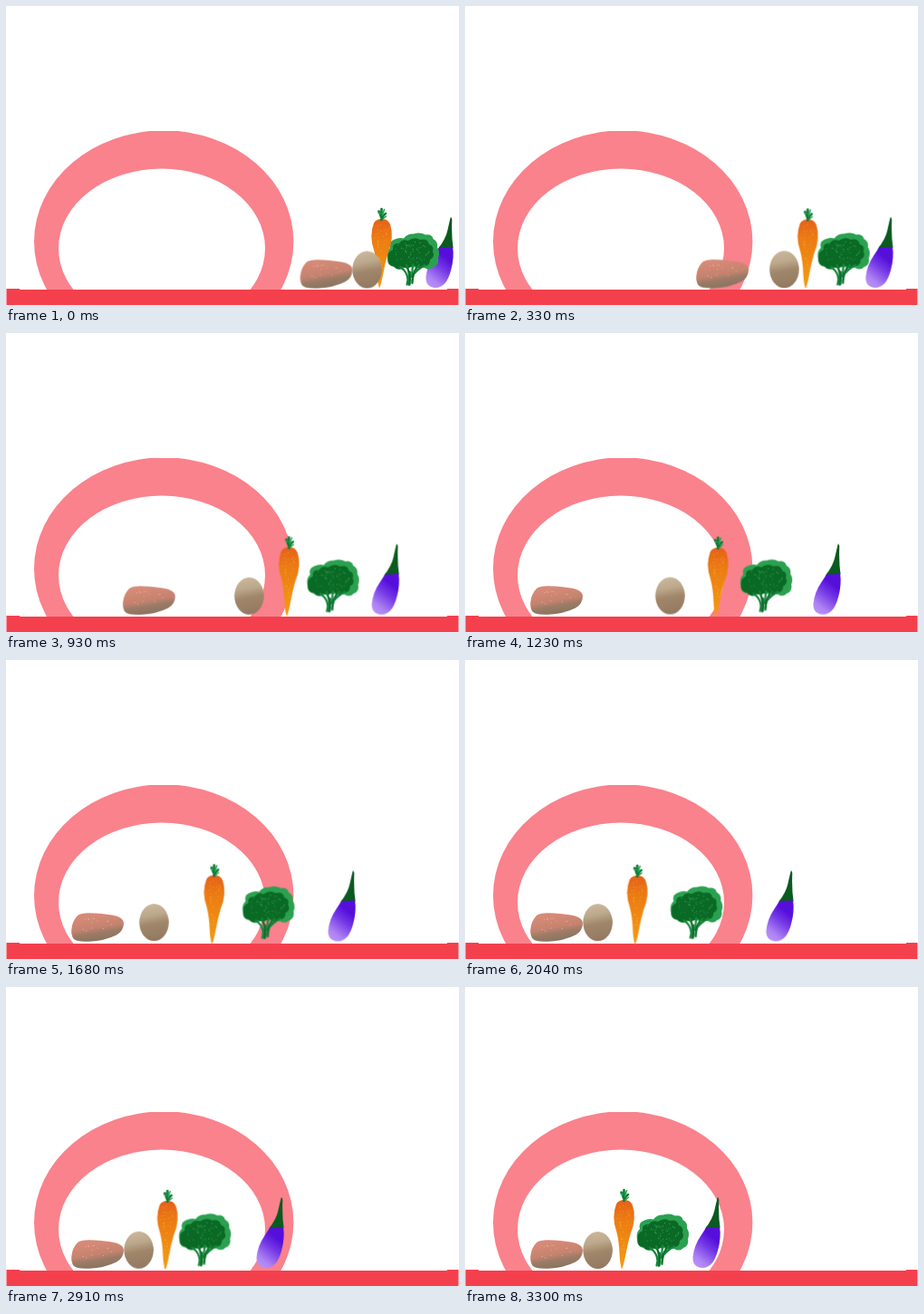
An HTML page that plays this animation: 500 px wide and 330 px high, repeating every 4630 ms.

```html
<!DOCTYPE html>
<html lang="en">
<head>
<meta charset="utf-8">
<title>Vegetables</title>
<style>
html, body { margin: 0; width: 100%; height: 100%; overflow: hidden; background: #fff; }
svg { display: block; width: 500px; height: 330px; }
.veg { animation: 4630ms infinite; }
#potato { animation-name: potato; }
#egg { animation-name: egg; }
#carrot { animation-name: carrot; }
#broccoli { animation-name: broccoli; }
#eggplant { animation-name: eggplant; }

/* Positions advance every 30 ms, then rest from 3300 ms on. */
@keyframes potato {
  0% { transform: translate(252.5px, .8px); animation-timing-function: steps(40); }
  25.917%, 100% { transform: none; }
}
@keyframes egg {
  0% { transform: translate(252px, .5px); animation-timing-function: steps(60); }
  38.876% { transform: translate(0, -1px); animation-timing-function: steps(50); }
  71.274%, 100% { transform: translate(0, 0); }
}
@keyframes carrot {
  0% { transform: translate(239px, 0); animation-timing-function: steps(70); }
  45.356% { transform: translate(8px, 3px); animation-timing-function: steps(40); }
  71.274%, 100% { transform: translate(0, 0); }
}
@keyframes broccoli {
  0% { transform: translate(231px, 0); animation-timing-function: steps(80); }
  51.835% { transform: translate(3px, -1px); animation-timing-function: steps(30); }
  71.274%, 100% { transform: translate(0, 0); }
}
@keyframes eggplant {
  0% { transform: translate(212px, 1px); animation-timing-function: steps(110); }
  71.274%, 100% { transform: translate(0, 0); }
}
</style>
</head>
<body>
<svg viewBox="0 0 500 330">
  <defs>
    <linearGradient id="potatoFill" x1=".35" y1="0" x2=".65" y2="1">
      <stop offset=".1" stop-color="#d68a77"/>
      <stop offset=".5" stop-color="#c5836f"/>
      <stop offset=".68" stop-color="#9c7b66"/>
      <stop offset="1" stop-color="#84735f"/>
    </linearGradient>
    <linearGradient id="eggFill" x1=".4" y1="0" x2=".55" y2="1">
      <stop offset="0" stop-color="#cbb79c"/>
      <stop offset=".3" stop-color="#bca88b"/>
      <stop offset=".55" stop-color="#a0866a"/>
      <stop offset="1" stop-color="#937961"/>
    </linearGradient>
    <linearGradient id="carrotFill" x1="0" y1="0" x2="0" y2="1">
      <stop offset="0" stop-color="#e5611a"/>
      <stop offset=".3" stop-color="#ec7c14"/>
      <stop offset="1" stop-color="#f49c10"/>
    </linearGradient>
    <linearGradient id="eggplantFill" x1=".75" y1="0" x2=".25" y2="1">
      <stop offset=".25" stop-color="#560fdb"/>
      <stop offset=".5" stop-color="#7438e6"/>
      <stop offset=".85" stop-color="#ae83f4"/>
      <stop offset="1" stop-color="#b890f6"/>
    </linearGradient>
    <clipPath id="ringClip"><path d="M0 138h500v175H0z"/></clipPath>
  </defs>

  <path clip-path="url(#ringClip)" fill="#f9828c" fill-rule="evenodd" d="M31 260a143.2 122.7 0 0 1 286.4 0a143.2 122.7 0 0 1-286.4 0z
    M58 267.5a114 88 0 0 1 228 0a114 88 0 0 1-228 0z"/>
  <path fill="#f4404d" d="M.5 312H15v1H487v-1h12.500v18H.5z"/>

  <g id="eggplant" class="veg">
    <path fill="url(#eggplantFill)" d="M267 264Q274 261 281 264Q283 277 279 291Q274 310 262 310Q251 309.500 251.500 298Q253 285 260 275Q264 269 267 264z"/>
    <path fill="#0b5a20" d="M278.600 232.500Q280 231.500 280.300 235Q279.500 252 281.600 266Q278 263.500 274.500 266Q270 264 264.800 267Q273.500 256 275.500 246Q277 239 278.600 232.500z"/>
  </g>

  <g id="broccoli" class="veg">
    <path fill="#2ba150" d="M190 279Q188.500 271 193 267Q191 260 198 257.500Q203 255 208 256.500Q212 251 219 251.500Q226 249 232 252.500Q239 251.500 240.500 257Q246 260 245 266Q248.500 272 246 278Q247.500 286 241 288Q237 292.500 231 289L210 288Q203 294 197 288Q190 287 190 279z"/>
    <path fill="#0a6a25" d="M190.500 279Q190 271 196 269Q195 261 203 262Q206 256.500 213 259Q220 254 226 258Q234 256 236 263Q242 265 240 271Q243 277 237 280Q237 287 231 287L225 290L219 286L212 290L207 288Q201 293 197 287Q190 286 190.500 279z"/>
    <g fill="none" stroke="#16843b" stroke-linecap="round">
      <path stroke-width="3.600" d="M214.500 294L214 307"/>
      <path stroke-width="2.200" d="M204 288Q212 293 212.500 302L211.500 307.500M211 286L214.500 297M218 285L217 299M225 286Q218 293 217.500 306M231 286Q223 291 219 296"/>
      <path stroke="#0a6428" stroke-width="1.200" d="M212.500 289Q216 298 214 308M222 288Q217 296 217 305"/>
    </g>
  </g>

  <g id="carrot" class="veg">
    <path fill="url(#carrotFill)" d="M175.500 235Q182.500 234.500 185 241Q187.500 248 186.800 256Q186 265 182.800 272Q179.500 283 177 297Q175 308 173 311.500Q171 306 170.500 294Q170 281 167.500 271Q164.300 262 164.300 254Q164.500 246 167 239.500Q169.500 235 175.500 235z"/>
    <g fill="none" stroke-linecap="round">
      <path stroke="#0d7b38" stroke-width="2.600" d="M175.500 236L175.500 224M175 233Q174 229 172.500 226.500M176 235Q177 231 180 229"/>
      <path stroke="#27a251" stroke-width="1.500" d="M176.500 231L178.500 224.500M174.500 229L172 228M177 235L180.500 232"/>
    </g>
  </g>

  <g id="potato" class="veg">
    <path fill="url(#potatoFill)" d="M72.200 298Q73 288 79 282Q83 279 92 279.200Q106 279.500 117 281.500Q129.500 283.500 130 290Q130 299 122 303.500Q109 310 92 310.700Q78 311.500 74.500 307.500Q72 304 72.200 298z"/>
  </g>

  <g id="egg" class="veg">
    <ellipse cx="146.600" cy="290.500" rx="16.300" ry="20.500" fill="url(#eggFill)"/>
  </g>
</svg>
<script>
let seed = 7;
const rand = () => (seed = seed * 16807 % 2147483647) / 2147483647;

// Scatter small dots inside an ellipse.
function speckle(id, count, cx, cy, rx, ry, color, size) {
  let d = '';
  for (let i = 0; i < count; i++) {
    const a = rand() * Math.PI * 2, r = Math.sqrt(rand());
    d += `M${(cx + rx * r * Math.cos(a)).toFixed(1)} ${(cy + ry * r * Math.sin(a)).toFixed(1)}h.01`;
  }
  const dots = document.createElementNS('http://www.w3.org/2000/svg', 'path');
  dots.setAttribute('d', d);
  dots.setAttribute('stroke', color);
  dots.setAttribute('stroke-width', size);
  dots.setAttribute('stroke-linecap', 'round');
  document.getElementById(id).append(dots);
}

speckle('potato', 14, 97, 292, 20, 9, '#e8b096', 1.2);
speckle('carrot', 24, 175.5, 256, 9, 16, '#f6b02c', .9);
speckle('carrot', 8, 174, 282, 3, 13, '#f8bd3c', .9);
speckle('broccoli', 42, 215, 272, 21, 12, '#2b9b4c', 1.1);
speckle('broccoli', 14, 218, 270, 19, 10, '#69bd79', .9);
</script>
</body>
</html>
```
